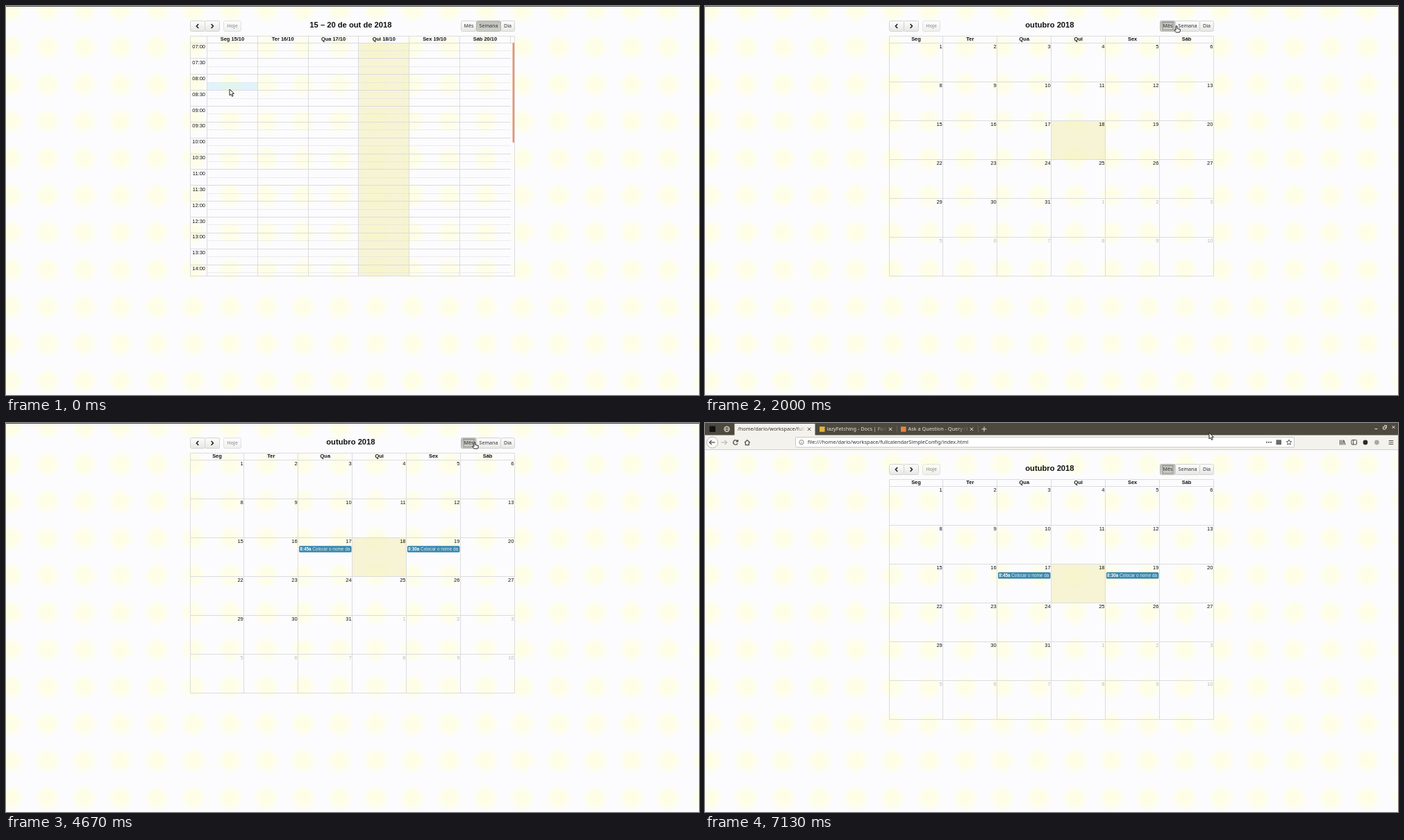
An HTML page with a canvas for the animation above (7170 ms loop, 998 px wide and 561 px high).

```html
<!DOCTYPE html>
<html lang="pt">
<head>
<meta charset="utf-8">
<title>Agenda</title>
<style>
html, body { margin: 0; width: 100%; height: 100%; overflow: hidden; }
canvas {
  display: block;
  background: #fcfcfe radial-gradient(circle, #fefee7 9px, #fefee700 20px) -19.3px -21.2px / 52.6px 53.5px;
}
</style>
</head>
<body>
<canvas id="stage" width="998" height="561"></canvas>
<script>
const c = document.getElementById('stage').getContext('2d');
const LOOP = 7170;
const SANS = '"Liberation Sans", Arial, sans-serif';
const UI = '"Noto Sans", sans-serif';
const LINE = '#dcdce0', BLUE = '#3a87ad';
const LEFT = 265, RIGHT = 732.5, TOP = 53, BOTTOM = 389.5;
const AXIS = 289.5, DAY_W = 72.8, SLOT_H = 11.43;
const CELL_W = 77.92, CELL_H = 56.1;
const DAYS = ['Seg', 'Ter', 'Qua', 'Qui', 'Sex', 'Sáb'];
const CHROME_AT = 6990, CHROME_H = 38;

// Pointer path: time, x, y
const PATH = [
  [0, 322, 120], [200, 324, 138], [420, 395, 127], [570, 397, 150],
  [900, 540, 127], [1060, 541, 150], [1330, 617, 105], [1390, 616, 126],
  [1500, 617, 150], [1540, 617, 150], [1750, 668, 29], [1920, 668, 29],
  [2090, 692, 29], [2690, 692, 29], [2840, 674, 53], [3040, 640, 92],
  [3200, 615, 126], [3330, 615, 150], [3520, 470, 138], [3640, 470, 161],
  [3800, 526, 121], [3840, 526, 121], [4550, 675, 28], [5010, 675, 28],
  [5090, 692, 29], [5450, 692, 29], [5570, 675, 28], [5970, 675, 28],
  [6090, 613, 198], [6470, 613, 198], [6980, 724, 1], [7130, 726, 14], [LOOP, 726, 14]
];

// Quarter-hour slots counted from 07:00; each event is dragged open, then dropped
const EVENTS = [
  { day: 0, slot: 5, drag: 0, drop: 200, end: 1920 },
  { day: 1, slot: 6, drag: 420, drop: 570, end: 1920 },
  { day: 3, slot: 6, drag: 900, drop: 1060, end: 1920 },
  { day: 4, slot: 6, drag: 1390, drop: 1500, end: 1920 },
  { day: 4, slot: 6, drag: 3200, drop: 3330, end: LOOP },
  { day: 2, slot: 7, drag: 3520, drop: 3640, end: LOOP }
];

const isMonth = t => (t >= 1920 && t < 2340) || (t >= 4670 && t < 5100) || t >= 5600;

function pointerAt(t) {
  const i = PATH.findIndex(p => p[0] > t);
  const [t0, x0, y0] = PATH[i - 1], [t1, x1, y1] = PATH[i];
  const u = (t - t0) / (t1 - t0), k = u * u * (3 - 2 * u);
  return { x: x0 + (x1 - x0) * k, y: y0 + (y1 - y0) * k };
}

function text(s, x, y, size, { color = '#111', align = 'left', bold = false, font = SANS } = {}) {
  c.font = `${bold ? 'bold ' : ''}${size}px ${font}`;
  c.textAlign = align;
  c.textBaseline = 'middle';
  c.fillStyle = color;
  c.fillText(s, x, y);
}

function box(x, y, w, h, fill, stroke, radius = 0) {
  c.beginPath();
  c.roundRect(x, y, w, h, radius);
  if (fill) { c.fillStyle = fill; c.fill(); }
  if (stroke) { c.strokeStyle = stroke; c.lineWidth = 1; c.stroke(); }
}

function path(points, stroke, width = 1, fill) {
  c.beginPath();
  points.forEach(([x, y]) => c.lineTo(x, y));
  if (fill) { c.closePath(); c.fillStyle = fill; c.fill(); }
  c.strokeStyle = stroke;
  c.lineWidth = width;
  c.stroke();
}

function disc(x, y, r, fill, stroke) {
  c.beginPath();
  c.arc(x, y, r, 0, 7);
  if (fill) { c.fillStyle = fill; c.fill(); }
  if (stroke) { c.strokeStyle = stroke; c.lineWidth = 1; c.stroke(); }
}

const snap = v => Math.floor(v) + 0.5;
const hLine = (y, x0 = LEFT, x1 = RIGHT) => path([[x0, snap(y)], [x1, snap(y)]], LINE);
const vLine = (x, y0 = 43.5, y1 = BOTTOM) => path([[snap(x), y0], [snap(x), y1]], LINE);

function button(label, x, w, active, focus) {
  const fill = c.createLinearGradient(0, 21, 0, 37);
  fill.addColorStop(0, active ? '#bdbdb9' : '#fefefe');
  fill.addColorStop(1, active ? '#cfcfca' : '#e6e6e4');
  box(x, 21.5, w, 15, fill, active ? '#b4b4b0' : '#d3d3d0', 2);
  text(label, x + w / 2, 28.7, 7.1, { color: '#333', align: 'center', font: UI });
  if (focus) {
    c.setLineDash([1, 1]);
    box(x + 3.5, 23.5, w - 7, 11, null, '#555');
    c.setLineDash([]);
  }
}

function toolbar(t, month) {
  button('', 265.5, 21);
  button('', 286.5, 21);
  path([[277.2, 26], [274.4, 29], [277.2, 32]], '#222', 1.6);
  path([[295.6, 26], [298.4, 29], [295.6, 32]], '#222', 1.6);
  c.globalAlpha = 0.6;
  button('Hoje', 313.5, 25);
  c.globalAlpha = 1;
  const clicked = t >= 1920;
  button('Mês', 655.5, 22, month, month && clicked);
  button('Dia', 712.5, 20);
  button('Semana', 677.5, 35, !month, !month && clicked);
  text(month ? 'outubro 2018' : '15 – 20 de out de 2018', 496.4, 28.3, 11.2, { bold: true, align: 'center' });
}

const clock = slot => `${7 + Math.floor(slot / 4)}:${String(slot % 4 * 15).padStart(2, '0')}`;
const today = (x, y, w, h) => box(x, y, w, h, 'rgba(243,240,190,.66)');

function weekView(t, pointer) {
  const dayX = d => AXIS + d * DAY_W;
  const slotY = s => TOP + s * SLOT_H;
  today(dayX(3), TOP, DAY_W, BOTTOM - TOP);
  for (let s = 0; slotY(s) < BOTTOM; s++) {
    if (s % 2) c.setLineDash([1, 1]);
    hLine(slotY(s), s % 2 ? AXIS : LEFT, 727);
    c.setLineDash([]);
    if (s % 2 === 0) text(clock(s).padStart(5, '0'), 287, slotY(s) + 6, 7.5, { align: 'right' });
  }
  DAYS.forEach((name, d) => {
    vLine(dayX(d));
    text(`${name} ${15 + d}/10`, dayX(d) + DAY_W / 2, 48.3, 7.45, { bold: true, align: 'center' });
  });
  vLine(726.5, 43.5, TOP);
  hLine(TOP);
  box(729.5, 53, 3, 144, '#ee9169', null, 1);

  for (const { day, slot, drag, drop, end } of EVENTS) {
    const x = dayX(day), y = slotY(slot);
    if (t >= drag && t < drop) {
      const last = Math.max(slot + 1, Math.ceil((pointer.y - TOP) / SLOT_H));
      box(x, y, DAY_W, slotY(last) - y, 'rgba(188,232,245,.42)');
    } else if (t >= drop && t < end) {
      box(snap(x + 1), snap(y), 69.5, 34, '#66a4bf', BLUE, 1.5);
      text(clock(slot), x + 2, y + 3.8, 5.4, { color: '#e8f3f7' });
      text('Colocar o nome da', x + 2, y + 11.7, 6.4, { color: '#f4fafc' });
      text('disciplina aqui', x + 2, y + 20, 6.4, { color: '#f4fafc' });
    }
  }
}

function monthView(t) {
  const cellX = d => LEFT + d * CELL_W;
  const rowY = r => TOP + r * CELL_H;
  today(cellX(3), rowY(2), CELL_W, CELL_H);
  for (let r = 0; r < 6; r++) {
    hLine(rowY(r));
    for (let d = 0; d < 6; d++) {
      const n = r * 7 + d + 1;
      text(n > 31 ? n - 31 : n, cellX(d + 1) - 1.2, rowY(r) + 5.6, 7.5,
        { align: 'right', color: n > 31 ? '#b9b9b9' : '#111' });
    }
  }
  DAYS.forEach((name, d) => {
    vLine(cellX(d));
    text(name, cellX(d) + CELL_W / 2, 48.3, 7.45, { bold: true, align: 'center' });
  });
  for (const { day, slot, drop, end } of EVENTS) {
    if (t < drop || t >= end) continue;
    const x = cellX(day) + 1.2, y = rowY(2) + 12;
    box(x, y, CELL_W - 2.4, 9.3, BLUE, null, 1.5);
    text(clock(slot) + 'a', x + 1.2, y + 4.7, 6.4, { bold: true, color: '#fff' });
    text('Colocar o nome da', x + 19.2, y + 4.7, 6.4, { color: '#e6f1f6' });
  }
}

function cross(x, y, color, r = 2.2) {
  path([[x - r, y - r], [x + r, y + r]], color);
  path([[x - r, y + r], [x + r, y - r]], color);
}

function tabTitle(label, x, width, color, background) {
  c.save();
  c.beginPath();
  c.rect(x, 0, width, 18);
  c.clip();
  text(label, x, 8.8, 7.3, { color, font: UI });
  const fade = c.createLinearGradient(x + width - 14, 0, x + width, 0);
  fade.addColorStop(0, background + '00');
  fade.addColorStop(1, background);
  box(x + width - 14, 1, 14, 16, fade);
  c.restore();
}

function browserChrome() {
  const dark = '#4d493f', light = '#f4f2ec', ink = '#4a4a48', pale = '#e8e5dc';
  box(0, 0, 998, 18, dark);
  box(0, 17.5, 998, 21, light);
  path([[0, 38.5], [998, 38.5]], '#d2d0ca');
  box(42.5, 1, 116, 17, light);

  box(6.5, 4.5, 8.5, 8.5, '#111');
  disc(31.5, 8.8, 3.8, null, pale);
  path([[27.7, 8.8], [35.3, 8.8]], pale, 0.7);
  c.beginPath();
  c.ellipse(31.5, 8.8, 1.8, 3.8, 0, 0, 7);
  c.stroke();
  box(165, 5.2, 7.5, 7.5, '#e5b53a');
  box(282, 5.2, 7.5, 7.5, '#e8843c');
  tabTitle('/home/dario/workspace/fullcal', 47, 98, '#333', light);
  tabTitle('lazyFetching - Docs | FullCal', 175.5, 85, pale, dark);
  tabTitle('Ask a Question - Query Nest', 292.5, 85, pale, dark);
  cross(150, 8.8, '#444');
  cross(267, 8.8, pale);
  cross(384, 8.8, pale);
  for (const x of [276.5, 393.5]) path([[x, 4], [x, 14]], '#67635a');
  path([[398.5, 8.8], [405.5, 8.8]], pale);
  path([[402, 5.3], [402, 12.3]], pale);
  path([[964.5, 8.5], [968.5, 8.5]], pale);
  box(976.5, 5.5, 3.5, 3.5, null, pale);
  path([[978, 3.5], [981.5, 3.5], [981.5, 7.5]], pale);
  cross(991.5, 6, pale, 2);

  disc(10.5, 28, 8, '#fcfbf9', '#bab8b3');
  for (const [x, dir, color] of [[10.5, 1, ink], [27.5, -1, '#bdbbb5']]) {
    path([[x - 4 * dir, 28], [x + 4 * dir, 28]], color, 1.2);
    path([[x - dir, 25], [x - 4 * dir, 28], [x - dir, 31]], color, 1.2);
  }
  c.beginPath();
  c.arc(44, 28, 3.2, 0.4, 5.5);
  c.strokeStyle = ink;
  c.lineWidth = 1.2;
  c.stroke();
  path([[47.6, 24.2], [47.6, 27], [44.8, 27]], ink, 1, ink);
  path([[57, 28.3], [60.8, 24.6], [64.6, 28.3]], ink, 1.2);
  path([[58.3, 28], [58.3, 31.6], [63.3, 31.6], [63.3, 28]], ink, 1.2);

  box(130.5, 20.5, 718, 14.5, '#fff', '#c9c7c2', 1.5);
  disc(139, 27.8, 3.2, null, '#85837f');
  path([[139, 27.2], [139, 29.7]], '#85837f');
  text('file:///home/dario/workspace/fullcalendarSimpleConfig/index.html', 147.8, 27.8, 7.4, { color: '#333', font: UI });
  for (const x of [809, 812, 815]) disc(x, 27.8, 1, ink);
  box(822.5, 24.3, 7.5, 7, '#6c6a67');
  const star = Array.from({ length: 11 }, (_, i) => {
    const r = i % 2 ? 1.8 : 4, a = i * Math.PI / 5;
    return [841 + r * Math.sin(a), 28 - r * Math.cos(a)];
  });
  path(star, ink, 0.9);

  for (const x of [914.5, 916.8, 919]) path([[x, 24.5], [x, 31.5]], ink, 1.1);
  path([[920, 25], [922, 31.5]], ink, 1.1);
  box(931, 24.5, 7.5, 6.5, null, ink, 1);
  path([[933.7, 24.5], [933.7, 31]], ink);
  disc(951, 28, 3.4, '#2b2b2b');
  disc(967.5, 28, 3.4, '#aaa8a3');
  for (const y of [25.5, 28, 30.5]) path([[984.7, y], [991.3, y]], ink);
}

const ARROW = [[0, 0], [0, 9], [2.1, 7.2], [3.6, 10.4], [5.1, 9.7], [3.7, 6.6], [6.4, 6.3]];
const HAND = [[-1, 0], [0.8, 0], [1, 3.6], [5, 4.5], [5.2, 7], [4.2, 9], [-0.8, 9], [-3.4, 6], [-2.5, 5], [-1, 6]];

function drawPointer({ x, y }, chrome) {
  const onButton = x > 655 && x < RIGHT && y > 21 && y < 37;
  const onHeader = x > LEFT && x < RIGHT && y > 43 && y < 60;
  c.save();
  c.translate(x, y);
  if (!chrome && onHeader) {
    path([[-1.8, 1], [1.8, 1]], '#333', 1.2);
    path([[0, 1], [0, 9]], '#333', 1.4);
    path([[-1.8, 9], [1.8, 9]], '#333', 1.2);
  } else {
    const shape = !chrome && onButton ? HAND : ARROW;
    path([...shape, shape[0]], '#222', 1, '#fff');
  }
  c.restore();
}

function draw(now) {
  const t = now % LOOP, month = isMonth(t), chrome = t >= CHROME_AT;
  const pointer = pointerAt(t);
  c.clearRect(0, 0, 998, 561);
  c.save();
  if (chrome) c.translate(0, CHROME_H);
  else box(0, 0, 998, 1, '#4a4a4a');
  toolbar(t, month);
  if (month) monthView(t);
  else weekView(t, pointer);
  box(265.5, 43.5, 467, 346, null, LINE);
  c.restore();
  if (chrome) browserChrome();
  drawPointer(pointer, chrome);
}

const start = performance.now();
function tick() {
  draw(performance.now() - start);
  requestAnimationFrame(tick);
}
tick();
</script>
</body>
</html>
```
